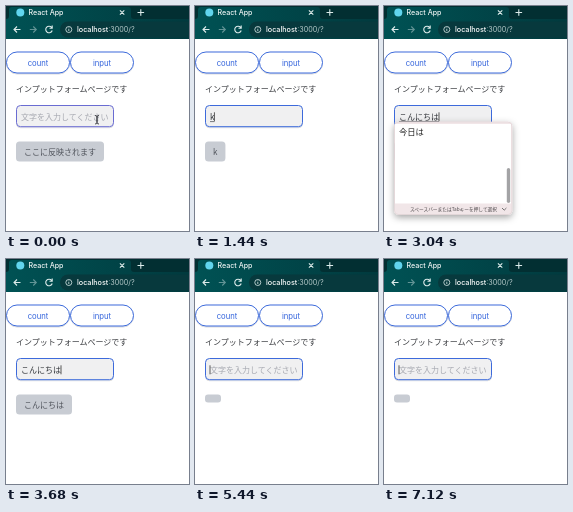
An HTML page for the animation above (7200 ms loop, 183 by 225 pixels).

```html
<!DOCTYPE html>
<html lang="ja">
<head>
<meta charset="utf-8">
<title>React App</title>
<style>
html, body { margin: 0; width: 100%; height: 100%; overflow: hidden; background: #fff; }
svg { display: block; width: 183px; height: 225px; }
text { font: 8px "Noto Sans CJK JP", "Noto Sans CJK", sans-serif; fill: #3a3c40; white-space: pre; }
.ui { font-family: Inter, "Open Sans", sans-serif; }
.icon { fill: none; stroke: #dcebea; stroke-width: 1.1; }
.link { font-size: 7.7px; fill: #3565dc; text-anchor: middle; }
</style>
</head>
<body>
<svg viewBox="0 0 183 225">
  <defs>
    <linearGradient id="bar">
      <stop offset="0" stop-color="#005254"/>
      <stop offset="1" stop-color="#013a3e"/>
    </linearGradient>
    <filter id="soft" x="-20%" y="-20%" width="140%" height="150%">
      <feDropShadow dx="0" dy=".8" stdDeviation=".6" flood-color="#000" flood-opacity=".18"/>
    </filter>
    <filter id="deep" x="-20%" y="-20%" width="140%" height="140%">
      <feDropShadow dx="0" dy="2.5" stdDeviation="3.5" flood-color="#000" flood-opacity=".36"/>
    </filter>
  </defs>

  <rect width="183" height="225" fill="#fff"/>
  <g id="browser">
    <rect width="183" height="33" fill="#022f32"/>
    <path d="M0 13V33H183V13H128Q125 13 125 10V4Q125 1 122 1H6Q3 1 3 4V10Q3 13 0 13Z" fill="url(#bar)"/>
    <rect x="54" y="15.5" width="140" height="16" rx="8" fill="#07393d"/>
    <circle cx="14.3" cy="6.5" r="4" fill="#61d5ee"/>
    <text class="ui" x="22.5" y="9.2" style="font-size:7.1px;font-weight:500;fill:#f2f7f7">React App</text>
    <path class="icon" d="M113.9 4.3l4.4 4.4M118.3 4.3l-4.4 4.4M131.5 6.5h6.6M134.8 3.2v6.6"/>
    <path class="icon" d="M14.5 23.5h-6.5M11 20.5l-3 3 3 3"/>
    <path class="icon" d="M23.8 23.5h6.5M27.3 20.5l3 3-3 3" opacity=".45"/>
    <path class="icon" d="M45.6 21.4A3.3 3.3 0 1 0 46.2 24.5M46.2 19.6v2.7h-2.7"/>
    <circle class="icon" cx="62.8" cy="23.5" r="3" style="stroke-width:.8"/>
    <path class="icon" d="M62.8 23v2M62.8 21.6v.7" style="stroke-width:.8"/>
    <text class="ui" x="71" y="26" style="font-size:7.2px;font-weight:500;fill:#fff">localhost<tspan fill="#b8cccc" font-weight="400">:3000/?</tspan></text>
  </g>

  <g fill="#fff" stroke="#3d6bdb" stroke-width="1">
    <rect x=".5" y="46" width="63" height="21" rx="10.5" filter="url(#soft)"/>
    <rect x="64.5" y="46" width="63" height="21" rx="10.5" filter="url(#soft)"/>
  </g>
  <text class="ui link" x="32" y="59.5">count</text>
  <text class="ui link" x="96" y="59.5">input</text>
  <text x="10" y="86.3">インプットフォームページです</text>

  <rect id="field" x="10.5" y="99.5" width="97" height="21.2" rx="4" fill="#f0f0f1" stroke-width="1" filter="url(#soft)"/>
  <text id="value" x="15" y="113.7"></text>
  <path id="under" stroke="#44474d" stroke-width=".7"/>
  <path id="caret" stroke="#333" stroke-width=".8"/>

  <rect id="chip" x="10" y="135.6" fill="#c8ccd3"/>
  <text id="echo" x="18" y="149" fill="#50545c"></text>

  <g id="popup">
    <rect x="10.5" y="116" width="117.5" height="92.5" rx="4" fill="#f1e6e8" stroke="#e2d3d6" stroke-width=".7" filter="url(#deep)"/>
    <rect x="11" y="118" width="116" height="79.5" fill="#fff"/>
    <text x="15" y="128.9" style="font-size:8.3px;fill:#222">今日は</text>
    <rect x="122.8" y="162" width="3.4" height="35" rx="1.7" fill="#a3a3a5"/>
    <text x="26" y="204.7" style="font-size:4.7px;fill:#4c474a">スペースバーまたはTabキーを押して選択</text>
    <path d="M118 202l2.2 2.2 2.2-2.2" fill="none" stroke="#555" stroke-width=".8"/>
  </g>

  <path id="pointer" d="M89 109.5q2 0 2 1.5v5.5q0 1.5-2 1.5M93 109.5q-2 0-2 1.5v5.5q0 1.5 2 1.5" fill="none" stroke="#33353a" stroke-width=".9"/>
</svg>
<script>
const LOOP = 7200, STEP = 80;
const FOCUS = 240, TYPED = 1360, OPEN = 2800, COMMIT = 3200;
const HINT = '文字を入力してください', INTRO = 'ここに反映されます';
const edits = [
  [TYPED, 'k'], [1520, 'こ'], [1760, 'こn'], [1920, 'こん'], [2080, 'こんn'],
  [2160, 'こんに'], [2320, 'こんにt'], [2400, 'こんにち'], [2560, 'こんにちh'],
  [2640, 'こんにちは'], [4400, 'こんにち'], [4640, 'こんに'], [4800, 'こん'],
  [4960, 'こ'], [5120, '']
];
const $ = id => document.getElementById(id);
const set = (id, attrs) => {
  for (const key in attrs) $(id).setAttribute(key, attrs[key]);
};
const show = (id, on) => set(id, { visibility: on ? 'visible' : 'hidden' });

function draw(t) {
  let since = FOCUS, text = '';
  for (const [at, str] of edits) if (t >= at) { since = at; text = str; }

  const value = $('value');
  value.textContent = text || HINT;
  value.style.fill = text ? '#33363b' : '#a6a8b0';
  const end = 15 + (text ? value.getComputedTextLength() : 0);

  const composing = t >= TYPED && t < COMMIT;
  if (t >= COMMIT) since = Math.max(since, COMMIT);
  set('under', { d: `M15 115.6H${end}` });
  show('under', composing);
  set('caret', { d: `M${end} 106.3V115.3` });
  show('caret', t >= FOCUS && (composing || (t - since) % 1000 < 500));
  set('field', { stroke: t < FOCUS ? '#6a6cd2' : '#3d6bdb' });

  const label = t < TYPED ? INTRO : text;
  const echo = $('echo');
  echo.textContent = label;
  echo.style.fill = '#50545c';
  set('chip', {
    width: 16 + (label ? echo.getComputedTextLength() : 0),
    height: label ? 20 : 7.8,
    rx: label ? 3.5 : 3
  });

  show('popup', t >= OPEN && t < COMMIT);
  show('pointer', t < TYPED);
}

const start = performance.now();
function tick() {
  const t = (performance.now() - start) % LOOP;
  draw(Math.floor(t / STEP) * STEP);
  requestAnimationFrame(tick);
}
tick();
</script>
</body>
</html>
```
